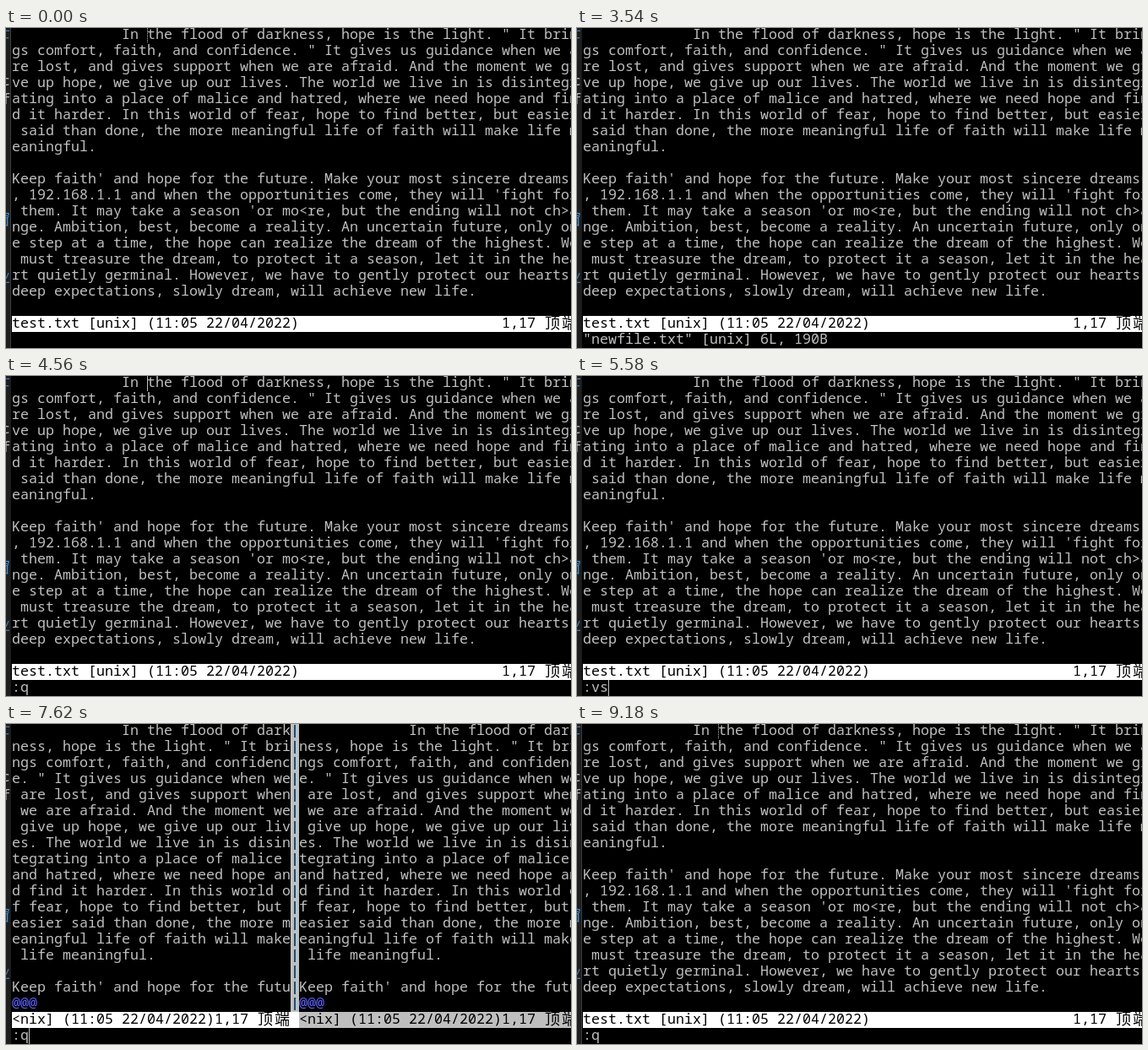
Recreate the animation shown at these times as an HTML page with a canvas. Size 669 px wide and 379 px high, loop 9.24 s.

```html
<!DOCTYPE html>
<html lang="en">
<head>
<meta charset="utf-8">
<title>Vim split windows</title>
<style>
html, body { margin: 0; width: 100%; height: 100%; overflow: hidden; background: #000; }
canvas { display: block; }
</style>
</head>
<body>
<canvas id="stage" width="669" height="379"></canvas>
<script>
(() => {
const ctx = document.getElementById('stage').getContext('2d');
const LOOP = 9240, LEFT = 7, CELL = 10, LINE = 19, ROWS = 18;
const GREY = '#bfbfbf', BLUE = '#6060ff';
const MONO = '16.667px "Noto Sans Mono", "DejaVu Sans Mono", monospace';
const CJK = '18px "Noto Sans CJK SC", "Noto Sans CJK", sans-serif';

const essay = [
  ' '.repeat(13) + 'In the flood of darkness, hope is the light. " It brings comfort, faith, ' +
  'and confidence. " It gives us guidance when we are lost, and gives support when we are ' +
  'afraid. And the moment we give up hope, we give up our lives. The world we live in is ' +
  'disintegrating into a place of malice and hatred, where we need hope and find it harder. ' +
  'In this world of fear, hope to find better, but easier said than done, the more ' +
  'meaningful life of faith will make life meaningful.',
  '',
  "Keep faith' and hope for the future. Make your most sincere dreams , 192.168.1.1 and " +
  "when the opportunities come, they will 'fight for them. It may take a season 'or mo<re, " +
  'but the ending will not ch>ange. Ambition, best, become a reality. An uncertain future, ' +
  'only one step at a time, the hope can realize the dream of the highest. We must treasure ' +
  'the dream, to protect it a season, let it in the heart quietly germinal. However, we have ' +
  'to gently protect our hearts deep expectations, slowly dream, will achieve new life.',
  ''
];
const notes = ['', ...Array(4).fill('Hey there, this is a tentative line.'),
  'Hey theHllre, this is a tentative line.'];

function wrap(lines, width) {
  const cut = new RegExp(`.{1,${width}}`, 'g');
  const rows = lines.flatMap(s => s.match(cut) || ['']);
  if (rows.length > ROWS) rows.splice(ROWS - 1, Infinity, '@@@');
  while (rows.length < ROWS) rows.push('~');
  return rows;
}
const wide = wrap(essay, 67), narrow = wrap(essay, 33), noteRows = wrap(notes, 33);

// [time, view, command line, cursor]
const steps = [
  [0, 'full', '', 'dim'],
  [120, 'full', '', 'text'],
  [660, 'full', ':', 'cmd'],
  [840, 'full', ':v', 'cmd'],
  [1020, 'full', ':vs', 'cmd'],
  [1260, 'full', ':vs ', 'cmd'],
  [1740, 'full', ':vs e', 'cmd'],
  [1980, 'full', ':vs ', 'cmd'],
  [2160, 'full', ':vs n', 'cmd'],
  [2340, 'full', ':vs ne', 'cmd'],
  [2460, 'full', ':vs new', 'cmd'],
  [2580, 'full', ':vs newf', 'cmd'],
  [2760, 'full', ':vs newfil', 'cmd'],
  [2880, 'full', ':vs newfile', 'cmd'],
  [2940, 'full', ':vs newfile.', 'cmd'],
  [3000, 'full', ':vs newfile.t', 'cmd'],
  [3120, 'full', ':vs newfile.tx', 'cmd'],
  [3240, 'full', ':vs newfile.txt', 'cmd'],
  [3540, 'full', '"newfile.txt" [unix] 6L, 190B', ''],
  [3600, 'notes', '"newfile.txt" [unix] 6L, 190B', 'text'],
  [4080, 'notes', '"newfile.txt" [unix] 6L, 190B', ''],
  [4200, 'notes', ':', 'cmd'],
  [4380, 'notes', ':q', 'cmd'],
  [4560, 'full', ':q', 'text'],
  [5040, 'full', ':q', ''],
  [5160, 'full', ':', 'cmd'],
  [5400, 'full', ':v', 'cmd'],
  [5580, 'full', ':vs', 'cmd'],
  [5760, 'twin', ':vs', 'text'],
  [6300, 'twin', ':vs', ''],
  [6780, 'twin', ':vs', 'text'],
  [7320, 'twin', ':vs', ''],
  [7440, 'twin', ':', 'cmd'],
  [7620, 'twin', ':q', 'cmd'],
  [7740, 'full', ':q', 'text'],
  [8280, 'full', ':q', ''],
  [8760, 'full', ':q', 'text'],
  [9180, 'full', ':q', 'dim']
];

const rowY = row => row * LINE - 1;
const colX = col => LEFT + col * CELL;
const isHan = ch => ch > '\u2fff';

function rect(color, x, y, w, h) {
  ctx.fillStyle = color;
  ctx.fillRect(x, y, w, h);
}

function put(text, col, row, color = GREY) {
  ctx.fillStyle = color;
  for (const ch of text) {
    const han = isHan(ch);
    ctx.font = han ? CJK : MONO;
    ctx.fillText(ch, colX(col) + (han ? 1 : 0), rowY(row) + (han ? 15 : 14));
    col += han ? 2 : 1;
  }
}

function pane(rows, col) {
  rows.forEach((s, i) => put(s, col, i, /^(~|@@@)$/.test(s) ? BLUE : GREY));
}

function statusBar(text, col, width, color) {
  rect(color, colX(col), rowY(ROWS), width * CELL, LINE);
  put(text, col, ROWS, '#000');
}

// Sliver of the window behind, at the left
function edge(focused) {
  rect('#1e1e1e', 0, 0, 5, 379);
  rect(focused ? '#1b1b1b' : '#3c3c3c', 5, 0, 1, 379);
  ctx.textAlign = 'right';
  const scraps = [['士', 12, '#3f78b0'], ['c', 68, GREY], ['f', 90, GREY],
    ['窗', 233, '#3f8fd8'], ['业', 301, '#3f78b0']];
  for (const [ch, y, color] of scraps) {
    ctx.font = isHan(ch) ? CJK : MONO;
    ctx.fillStyle = color;
    ctx.fillText(ch, 5, y);
  }
  ctx.textAlign = 'left';
}

function split(rows, info) {
  pane(rows, 0);
  rect(GREY, colX(33), 0, CELL, rowY(ROWS));
  for (let i = 0; i < ROWS; i++) rect('#16507c', colX(33) + 4, rowY(i) + 2, 2, 15);
  pane(narrow, 34);
  statusBar(info, 0, 34, '#fff');
  statusBar('<nix] (11:05 22/04/2022)1,17 顶端', 34, 33, GREY);
}

function draw(now) {
  const t = now % LOOP;
  const [, view, cmd, cursor] = steps.filter(s => s[0] <= t).pop();
  rect('#000', 0, 0, 669, 379);
  edge(cursor !== 'dim');

  if (view === 'full') {
    pane(wide, 0);
    statusBar('test.txt [unix] (11:05 22/04/2022)'.padEnd(58) + '1,17 顶端', 0, 67, '#fff');
  } else if (view === 'notes') {
    split(noteRows, '<nix] (12:40 18/04/2022)2,36 全部');
  } else {
    split(narrow, '<nix] (11:05 22/04/2022)1,17 顶端');
  }

  put(cmd, 0, ROWS + 1);
  const [col, row] = cursor === 'cmd' ? [cmd.length, ROWS + 1] : view === 'notes' ? [2, 2] : [16, 0];
  if (cursor === 'dim') {
    for (let y = 0; y < 18; y += 2) rect(GREY, colX(col), y, 1, 1);
  } else if (cursor) {
    rect(GREY, colX(col), rowY(row), 1, LINE);
  }
  requestAnimationFrame(draw);
}
requestAnimationFrame(draw);
})();
</script>
</body>
</html>
```
